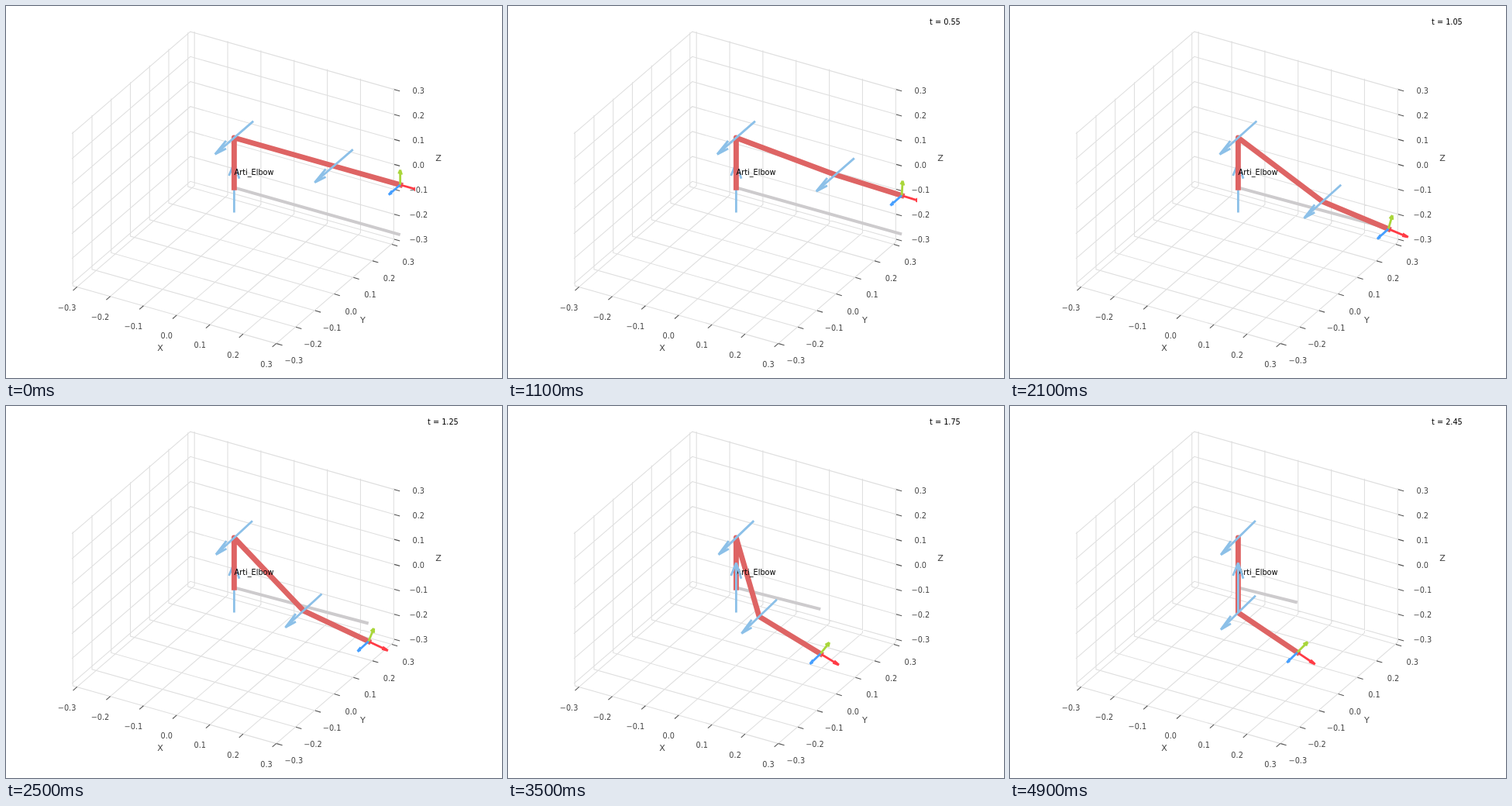
Recreate the animation shown at these times as an HTML page. Size 640 px wide and 480 px high, loop 5000 ms.

```html
<!DOCTYPE html>
<html lang="en">
<head>
<meta charset="utf-8">
<title>Arm motion</title>
<style>
  html, body { margin: 0; width: 100%; height: 100%; overflow: hidden; background: #fff; }
  svg { display: block; width: 640px; height: 480px; }
  path { fill: none; }
  text { font: 9.72px "DejaVu Sans", sans-serif; fill: #000; white-space: pre; }
  .tick { fill: #444; text-anchor: middle; }
  .axis { font-size: 11.1px; fill: #444; text-anchor: middle; }
  .grid { stroke: #dfdfdf; stroke-width: 1.1; }
  .marks { stroke: #555; stroke-width: 1.1; }
  .shadow { stroke: #cdcbcd; stroke-width: 4; }
  .arm { stroke: #de6464; stroke-width: 6.9; stroke-linejoin: round; stroke-linecap: square; }
  .joint { stroke: #8cc0e8; stroke-width: 2.8; }
  .tool { stroke-width: 2.8; }
</style>
</head>
<body>
<svg viewBox="0 0 640 480">
  <clipPath id="view"><rect width="528" height="480"/></clipPath>
  <g id="box"></g>
  <g id="scene" clip-path="url(#view)"></g>
  <text id="clock" x="544" y="24"></text>
</svg>
<script>
const $ = id => document.getElementById(id);
const box = $('box'), scene = $('scene'), clock = $('clock');

function add(parent, tag, cls, attrs = {}, text = '') {
  const el = document.createElementNS('http://www.w3.org/2000/svg', tag);
  el.setAttribute('class', cls);
  for (const key in attrs) el.setAttribute(key, attrs[key]);
  el.textContent = text;
  parent.appendChild(el);
  return el;
}

// Parallel projection of a 3D point to the stage
const project = ([x, y, z]) => [
  294.4 + 428.5 * x + 247.5 * y,
  234.4 + 121.5 * x - 213.5 * y - 322 * z
];
const line = (...pts) =>
  'M' + pts.map(p => project(p).map(v => v.toFixed(2)).join(' ')).join('L');
const plus = (a, b, k = 1) => a.map((v, i) => v + b[i] * k);
const cross = (a, b) => [
  a[1] * b[2] - a[2] * b[1],
  a[2] * b[0] - a[0] * b[2],
  a[0] * b[1] - a[1] * b[0]
];

function drawBox() {
  const wall = 0.3125, open = 0.305, rim = 0.31;
  let grid = '', marks = '';
  const label = (x, y, text, cls = 'tick', drop = 3.5) =>
    add(box, 'text', cls, { x, y: Math.floor(y + drop) }, text);
  const mark = (p, dx, dy) => {
    const [x, y] = project(p);
    marks += `M${x - dx} ${y - dy}L${x + dx} ${y + dy}`;
  };

  for (let i = 0; i < 7; i++) {
    const v = (i - 3) / 10;
    const text = (v < 0 ? '\u2212' : '') + Math.abs(v).toFixed(1);
    grid += line([v, -open, -wall], [v, wall, -wall], [v, wall, open])
          + line([open, v, -wall], [-wall, v, -wall], [-wall, v, open])
          + line([-wall, -open, v], [-wall, wall, v], [open, wall, v]);
    mark([v, -rim, -wall], -2.6, 2.3);
    mark([rim, v, -wall], 3.6, 1.1);
    mark([rim, wall, v], 3.6, 1);
    label(78.6 + 42.9 * i, 389.6 + 12.2 * i, text);
    label(371.3 + 24.65 * i, 458.4 - 21.3 * i, text);
    label(532.3, 302.4 - 32.1 * i, text);
  }
  add(box, 'path', 'grid', { d: grid });
  add(box, 'path', 'marks', { d: marks });
  label(199, 441, 'X', 'axis', 4);
  label(460.5, 405, 'Y', 'axis', 4);
  label(558, 196.5, 'Z', 'axis', 4);
}

// Shaft plus two barbs turned 15 degrees from it
function arrow(from, dir) {
  const tip = plus(from, dir);
  const flat = Math.hypot(dir[0], dir[1]);
  const hinge = flat > 1e-6 ? [dir[1] / flat, -dir[0] / flat, 0] : [0, 1, 0];
  const side = cross(hinge, dir);
  const barb = s => line(tip, plus(plus(tip, dir, -0.29), side, s * 0.0776));
  return line(from, tip) + barb(1) + barb(-1);
}
const scaled = (v, k) => v.map(c => c * k);
const centred = (at, dir) => arrow(plus(at, dir, -0.1), scaled(dir, 0.2));

drawBox();
const shadow = add(scene, 'path', 'shadow');
const base = add(scene, 'path', 'joint', { d: centred([0, 0, 0], [0, 0, 1]) });
const arm = add(scene, 'path', 'arm');
add(scene, 'text', '', { x: 294.6, y: 218 }, 'Arti_Elbow');
const shoulderAxis = add(scene, 'path', 'joint');
const elbowAxis = add(scene, 'path', 'joint');
const toolAxes = ['#ff3b45', '#a9d63a', '#469fff'].map(stroke =>
  add(scene, 'path', 'tool', { stroke }));

const STEPS = 50, STEP_MS = 100;
const RAD = Math.PI / 180;
const ease = s => s * s * s * (10 - 15 * s + 6 * s * s);

function pose(step) {
  const p = ease(step / (STEPS - 1));
  const yaw = 3 * p * RAD, upper = 90 * p * RAD, fore = 30 * p * RAD;
  const reach = (pitch, turn = 0) => [
    Math.cos(pitch + turn) * Math.cos(yaw),
    Math.cos(pitch + turn) * Math.sin(yaw),
    -Math.sin(pitch + turn)
  ];
  const hinge = [Math.sin(yaw), -Math.cos(yaw), 0];
  const origin = [0, 0, 0], shoulder = [0, 0, 0.2];
  const elbow = plus(shoulder, reach(upper), 0.3);
  const tool = plus(elbow, reach(fore), 0.2);

  shadow.setAttribute('d', line(origin, [tool[0], tool[1], 0]));
  arm.setAttribute('d', line(origin, shoulder, elbow, tool));
  shoulderAxis.setAttribute('d', centred(shoulder, hinge));
  elbowAxis.setAttribute('d', centred(elbow, hinge));
  [reach(fore), reach(fore, -Math.PI / 2), hinge].forEach((dir, i) =>
    toolAxes[i].setAttribute('d', arrow(tool, scaled(dir, 0.06))));

  // The base arrow comes to the front once the arm has swung behind it
  scene.insertBefore(base, step < 35 ? arm : shoulderAxis);
  clock.textContent = step ? 't = ' + (step * 0.05).toFixed(2) : '';
}

const start = performance.now();
let shown = -1;
function tick() {
  const step = Math.floor((performance.now() - start) / STEP_MS) % STEPS;
  if (step !== shown) pose(shown = step);
  requestAnimationFrame(tick);
}
tick();
</script>
</body>
</html>
```
